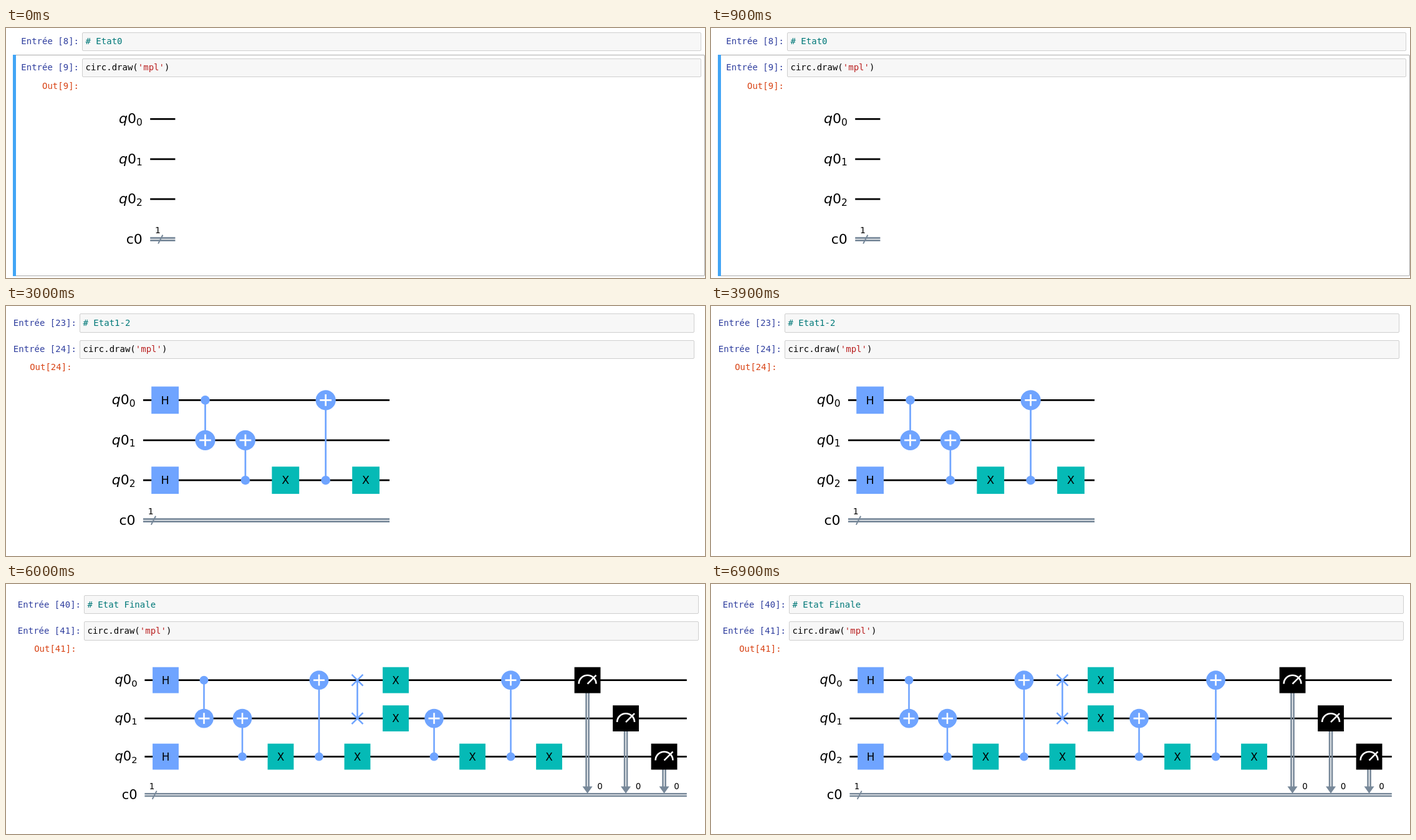
Animation of 1121 by 402 pixels, one loop 7500 ms. Source, as an HTML page:

```html
<!DOCTYPE html>
<html lang="fr">
<head>
<meta charset="utf-8">
<title>Circuit</title>
<style>
  html, body { margin: 0; width: 100%; height: 100%; overflow: hidden; background: #fff; }
  svg { display: block; }
  text { white-space: pre; }
  .code { font: 14px "DejaVu Sans Mono", monospace; }
  .label, .gate, .small { font-family: "DejaVu Sans", sans-serif; }
  .label { font-size: 22px; text-anchor: end; }
  .gate { font-size: 17.6px; text-anchor: middle; }
  .small { font-size: 14px; text-anchor: middle; }
  .line { fill: none; stroke-width: 2.7; }
</style>
</head>
<body>
<svg id="stage" width="1121" height="402" viewBox="0 0 1121 402"></svg>
<script>
const STEP = 1500, PITCH = 64.4;
const BLUE = "#6fa4ff", TEAL = "#05bab6", GREY = "#778899";
const stage = document.getElementById("stage");

// [kind, column, row, second row]
const ops = [
  ["H", 0, 0], ["H", 0, 2], ["cx", 1, 0, 1],
  ["cx", 2, 2, 1], ["X", 3, 2], ["cx", 4, 2, 0], ["X", 5, 2],
  ["swap", 5, 0, 1], ["X", 6, 0], ["X", 6, 1], ["cx", 7, 2, 1],
  ["X", 8, 2], ["cx", 9, 2, 0], ["X", 10, 2],
  ["measure", 11, 0], ["measure", 12, 1], ["measure", 13, 2]
];

// box: left, right; rows: top and bottom of both inputs; base: text baselines
const scenes = [
  { cell: 8, note: "Etat0", box: [122.5, 1114.5], rows: [7.5, 36.5, 49.5, 78.5], base: [26, 68, 98],
    at: [266.4, 146.4], scale: 1, cols: 0, count: 0, selected: true },
  { cell: 15, note: "Etat0-1", box: [118.5, 1103.5], rows: [4.5, 33.5, 46.5, 75.5], base: [23, 66, 95],
    at: [255.1, 143.4], scale: 1, cols: 2, count: 3 },
  { cell: 23, note: "Etat1-2", box: [118.5, 1103.5], rows: [12.5, 42.5, 55.5, 84.5], base: [32, 74, 103],
    at: [255.1, 151.4], scale: 1, cols: 6, count: 7 },
  { cell: 34, note: "Etat2-3", box: [128.5, 1113.5], rows: [7.5, 36.5, 49.5, 79.5], base: [27, 69, 98],
    at: [265.1, 146.4], scale: 1, cols: 11, count: 14 },
  { cell: 40, note: "Etat Finale", box: [125.5, 1110.5], rows: [18.5, 47.5, 60.5, 90.5], base: [38, 80, 109],
    at: [256, 154.6], scale: 0.955, cols: 14, count: 17 }
];

const path = (d, color, extra = "") => `<path class="line" d="${d}" stroke="${color}" ${extra}/>`;
const text = (cls, x, y, body, extra = "") => `<text class="${cls}" x="${x}" y="${y}" ${extra}>${body}</text>`;
const square = color => `<rect x="-21.9" y="-21.9" width="43.8" height="43.8" fill="${color}"/>`;
const cross = (x, y, r) => `M${x - r} ${y - r}l${2 * r} ${2 * r}m0 ${-2 * r}l${-2 * r} ${2 * r}`;

function drawOp([kind, col, row, other]) {
  const span = (other - row) * PITCH;
  let art;
  if (kind === "cx") {
    art = path(`M0 0V${span}`, BLUE) + `<circle r="7.3" fill="${BLUE}"/>`
      + `<circle cy="${span}" r="16.1" fill="${BLUE}"/>`
      + path(`M-9.4 ${span}H9.4M0 ${span - 9.4}V${span + 9.4}`, "#fff");
  } else if (kind === "swap") {
    art = path(`M0 0V${span}` + cross(0, 0, 9.4) + cross(0, span, 9.4), BLUE);
  } else if (kind === "measure") {
    const bus = (3 - row) * PITCH;
    art = path(`M-2.1 0V${bus - 13}M2.1 0V${bus - 13}`, GREY)
      + `<path d="M-8.4 ${bus - 14.2}H8.4L0 ${bus - 2.5}Z" fill="${GREY}"/>`
      + square("#000")
      + path("M-14.6 6.3A14.6 14.6 0 0 1 14.6 6.3M0 6.3L14.6 -8.4", "#fff")
      + text("small", 21, bus - 9.4, "0");
  } else {
    art = square(kind === "H" ? BLUE : TEAL) + text("gate", 0, 6.2, kind);
  }
  return `<g transform="translate(${col * PITCH} ${row * PITCH})">${art}</g>`;
}

function drawCircuit({ at, scale, cols, count }) {
  const end = cols ? (cols - 0.41) * PITCH : 5;
  const bus = 3 * PITCH;
  let art = "";
  for (let i = 0; i < 3; i++) {
    const y = i * PITCH;
    art += path(`M-35.2 ${y}H${end}`, "#000")
      + text("label", -47.6, y + 7,
        `<tspan font-style="italic">q</tspan>0<tspan font-size="15.4" dy="3.6">${i}</tspan>`);
  }
  art += path(`M-35.2 ${bus - 2}H${end}M-35.2 ${bus + 2}H${end}`, GREY)
    + path(`M-22.3 ${bus + 7.2}L-15 ${bus - 6.8}`, GREY, 'style="stroke-width:2"')
    + text("label", -47.6, bus + 7, "c0")
    + text("small", -23, bus - 9.2, "1")
    + ops.slice(0, count).map(drawOp).join("");
  return `<g transform="translate(${at}) scale(${scale})">${art}</g>`;
}

function drawNotebook({ cell, note, box: [left, right], rows, base, selected }) {
  const input = (top, bottom) => `<rect x="${left}" y="${top}" width="${right - left}" height="${bottom - top}"`
    + ` rx="1.5" fill="#f7f7f7" stroke="#cfcfcf"/>`;
  const prompt = (x, y, word, n, color) =>
    text("code", x, y, `${word}[${n}]:`, `text-anchor="end" fill="${color}"`);
  const edge = left - 5.5, start = left + 5;
  const frame = selected
    ? '<rect x="11.5" y="43.5" width="1109" height="355" rx="1.5" fill="none" stroke="#ababab"/>'
      + '<rect x="11" y="43" width="5" height="356" fill="#42a5f5"/>'
    : "";
  return frame + input(rows[0], rows[1]) + input(rows[2], rows[3])
    + prompt(edge, base[0], "Entrée ", cell, "#303f9f")
    + prompt(edge, base[1], "Entrée ", cell + 1, "#303f9f")
    + prompt(selected ? edge : edge - 7.4, base[2], "Out", cell + 1, "#d84315")
    + text("code", start, base[0], `# ${note}`, 'fill="#007979" font-style="italic"')
    + text("code", start, base[1], `circ.draw(<tspan fill="#ba2121">'mpl'</tspan>)`);
}

let shown = -1;
function update(time) {
  const index = Math.floor(time / STEP) % scenes.length;
  if (index !== shown) {
    shown = index;
    stage.innerHTML = drawNotebook(scenes[index]) + drawCircuit(scenes[index]);
  }
}

const begin = performance.now();
function tick() {
  update(performance.now() - begin);
  requestAnimationFrame(tick);
}
tick();
</script>
</body>
</html>
```
